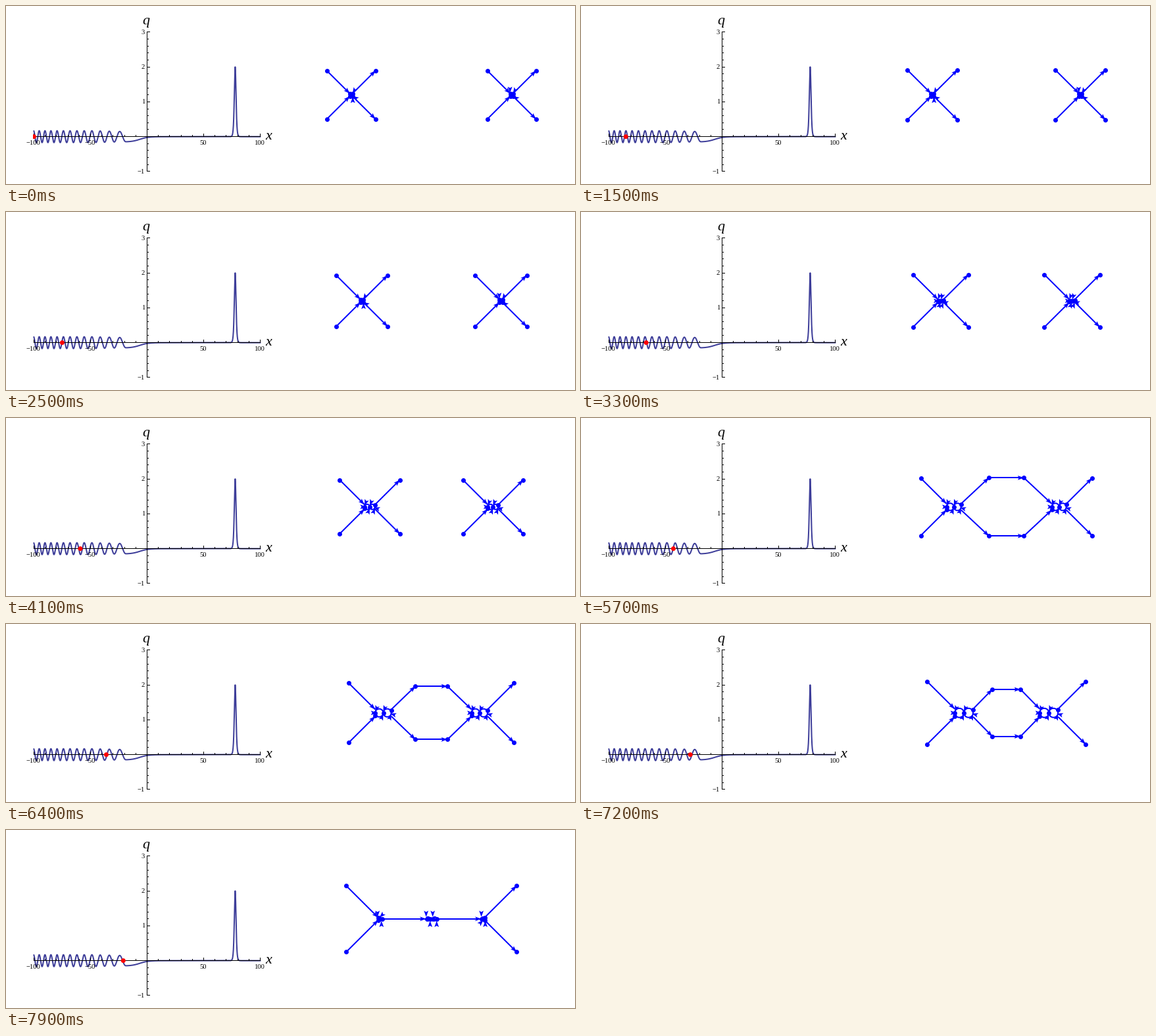
Animation, 865 px wide and 272 px high, one loop 8 s. Source, as a matplotlib script:

```python
import numpy as np
import matplotlib.pyplot as plt
from matplotlib.animation import FuncAnimation
from matplotlib.collections import LineCollection, PolyCollection
from matplotlib.patches import Circle, Rectangle

W, H, DPI = 865, 272, 100
FRAMES, INTERVAL = 80, 100
PX = 72 / DPI
BLUE, CURVE = "#0000ff", "#3d3d99"
MID = np.array([646.7, 135.8])   # origin of the contour plane
K_START = 122.0                  # stationary point at x = -100

fig = plt.figure(figsize=(W / DPI, H / DPI), dpi=DPI, facecolor="white")
ax = fig.add_axes([0, 0, 1, 1])
ax.set(xlim=(0, W), ylim=(H, 0))
ax.axis("off")


# ---- left: the solution q(x) ----
def sx(x):
    return 214.4 + 1.72 * np.asarray(x)


def sy(q):
    return 199.65 - 53.3 * np.asarray(q)


def solution(x):
    r = np.abs(x)
    phase = 2 * np.pi * (r ** 1.5 - 118.6) / 73.8
    wave = (0.145 + 0.025 * np.clip((r - 19) / 30, 0, 1)) * np.cos(phase)
    tail = -0.152 / (1 + np.exp((x + 6.3) / 3.7))
    return np.where(x < -18.8, wave, tail) + 2 / np.cosh(x - 77.9) ** 2


def segment(x0, y0, x1, y1):
    """Black hairline on pixel centres."""
    xs, ys = np.floor([x0, x1]) + 0.5, np.floor([y0, y1]) + 0.5
    ax.plot(xs, ys, color="black", lw=PX, snap=False,
            solid_capstyle="projecting", zorder=3)


def label(x, y, text, size=10.5, **kw):
    kw = {"ha": "center", "va": "center", **kw}
    ax.text(x, y, text, fontsize=size * PX, family="Liberation Serif", zorder=5, **kw)


xs = np.linspace(-100, 100, 3000)
ax.plot(sx(xs), sy(solution(xs)), color=CURVE, lw=2 * PX, zorder=2)

segment(sx(-100), sy(0), sx(100), sy(0))
segment(sx(0), sy(3), sx(0), sy(-1))
for x in range(-100, 101, 10):
    segment(sx(x), sy(0), sx(x), sy(0) - (4 if x % 50 == 0 else 2))
for n in range(-5, 16):
    segment(sx(0), sy(n / 5), sx(0) + (4 if n % 5 == 0 else 2), sy(n / 5))
for x in (-100, -50, 50, 100):
    label(sx(x) - 1.2, 209.5, str(x).replace("-", "\u2212"))
for q in (-1, 1, 2, 3):
    label(211, sy(q) + 0.5, str(q).replace("-", "\u2212"), ha="right")
label(212.7, 23.8, "q", 22, style="italic")
label(399, 199.3, "x", 22, style="italic")

marker = ax.add_patch(Circle((0, sy(0)), 3.5, color="red", lw=0, zorder=4))
marker.set_clip_path(Rectangle((41, 0), 360, H, transform=ax.transData))

# ---- right: the deforming contours ----
lines = LineCollection([], colors=BLUE, linewidths=2 * PX, zorder=2)
heads = PolyCollection([], facecolors=BLUE, edgecolors="none", zorder=3)
nodes = ax.scatter([], [], s=(7 * PX) ** 2, c=BLUE, linewidths=0, zorder=4)
ax.add_collection(lines)
ax.add_collection(heads)


class Contour:
    """Collects lines, arrowheads and nodes in coordinates around MID."""

    def __init__(self):
        self.lines, self.heads, self.nodes = [], [], []

    def head(self, tip, direction):
        d = np.array(direction, float)
        d /= np.hypot(*d)
        n = np.array([-d[1], d[0]])
        tip = MID + tip
        back = tip - 9.5 * d
        self.heads.append([tip, back + 3.4 * n, tip - 7.5 * d, back - 3.4 * n])

    def arrow(self, p, q):
        p, q = np.array(p, float), np.array(q, float)
        self.lines.append([MID + p, MID + q])
        self.head(q, q - p)

    def dot(self, *points):
        self.nodes += [MID + p for p in points]

    def ring(self, x, r):
        a = np.linspace(0, 2 * np.pi, 25)
        self.lines.append(np.c_[x + r * np.cos(a), r * np.sin(a)] + MID)

    def arms(self, x, side, inner, outer):
        """Two diagonal arms, directed left to right."""
        for s in (-1, 1):
            near = (x + side * inner[0], s * inner[1])
            far = (x + side * outer[0], s * outer[1])
            self.arrow(*((far, near) if side < 0 else (near, far)))
            self.dot(far)


def tight_cluster(c, x, side, w):
    c.head((x + 2, -2), (-0.6, 1))
    c.head((x + 2, 2), (-1, -0.6))
    if side < 0:
        c.head((x + 2.5, 3), (0, -1))
    else:
        c.head((x - 2.5, -3), (0, 1))
    c.dot((x, 0), *((x + i * w, j * w) for i in (-1, 1) for j in (-1, 1)))


def ring_cluster(c, x, w, v):
    r = w / 2
    for p in (x - r, x + r):
        c.ring(p, r)
        c.head((p - r, -2), (-0.4, 1))
        c.head((p + r, 2), (0.4, -1))
    c.head((x - w + 3, 0), (1, 0))
    c.head((x + w - 2, 1), (-1, -0.3))
    c.dot((x - w, v - 1), (x - w, 0), (x, 0), (x + w, 1 - v))


def dispersive(c, f, k0, ext):
    w = np.interp(f, [0, 27, 36, 41, 50, 64, 72], [2, 2.3, 5.3, 8, 10, 12.3, 14])
    v = max(min(w, 2.3), 0.43 * w)
    far = (ext + w - v, ext)
    joined = f >= 54
    gap, top = k0 / 3, 0.555 * k0
    for side in (-1, 1):
        x = side * k0
        for s in (-1, 1):
            inner_side = joined and s == -side
            c.arms(x, s, (w, v), (k0 - gap, top) if inner_side else far)
        if f < 28:
            tight_cluster(c, x, side, w)
        else:
            ring_cluster(c, x, w, v)
    if joined:
        for s in (-1, 1):
            c.arrow((-gap, s * top), (gap, s * top))


def shock(c, f, k0, ext):
    a = 5 + 30.3 * (1 - ((f - 73) / 6) ** 1.2)
    b = np.sqrt(2 * k0 ** 2 - a ** 2)
    r = 3
    for p in (-b, -a, a, b):
        c.ring(p, r)
        c.head((p - r, -3), (0, 1))
        c.head((p + r, 3), (0, -1))
    c.arrow((-b + r, 0), (-a - r, 0))
    c.arrow((-a + r, 0), (a - r, 0))
    c.arrow((a + r, 0), (b - r, 0))
    c.dot((-b + r + 1, 0), (-a - r + 1, 0), (-a + r, 0), (a - r, 0), (a + r, 0), (b - r, 0))
    for side in (-1, 1):
        c.arms(side * b, side, (2, 2), (ext, ext))
        c.head((side * b, side * 2), (side, -side))
        c.dot((side * (b + 2), -2), (side * (b + 2), 2))


def draw(f):
    x = f - 100
    k = np.sqrt(-x / 100)
    marker.center = (sx(x), sy(0))
    c = Contour()
    (dispersive if f < 73 else shock)(c, f, K_START * k, 37 * k ** -0.4)
    lines.set_segments(c.lines)
    heads.set_verts(c.heads)
    nodes.set_offsets(c.nodes)
    return marker, lines, heads, nodes


anim = FuncAnimation(fig, draw, frames=FRAMES, interval=INTERVAL,
                     repeat=True, repeat_delay=0, blit=False)
plt.show()
```
